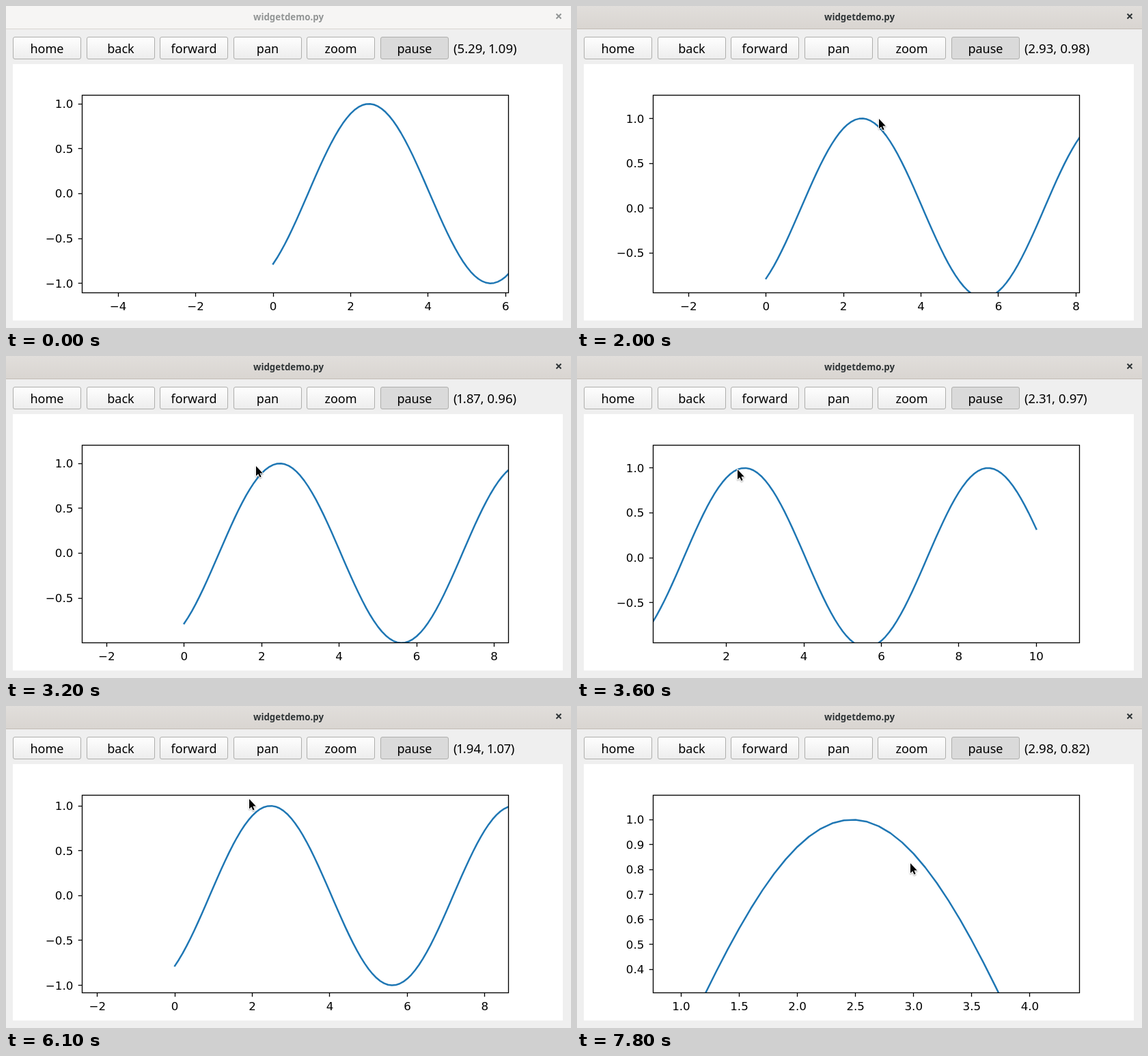
An HTML page with a canvas for the animation above (8 s loop, 827x471 px).

```html
<!DOCTYPE html>
<html lang="en">
<head>
<meta charset="utf-8">
<title>Widget demo</title>
<style>
html, body { margin: 0; width: 100%; height: 100%; overflow: hidden; background: #efefef; }
body { position: relative; font: 18px "Noto Sans", sans-serif; color: #000; }
#bar {
  position: absolute; left: 0; top: 0; width: 827px; height: 33px; box-sizing: border-box;
  font-weight: bold; font-size: 13.3px; line-height: 32px; text-align: center;
  animation: focus 8s step-end infinite;
}
@keyframes focus {
  0% { background: #f6f5f4; color: #929595; box-shadow: 0 1px #dad6d2; }
  15%, 100% { background: linear-gradient(#e1dedb, #d9d5d1); color: #2e3436; box-shadow: 0 1px #c3bcb5; }
}
#bar svg { position: absolute; left: 804px; top: 10px; stroke: currentColor; stroke-width: 2; }
.btn {
  position: absolute; top: 45px; width: 100px; height: 33px; box-sizing: border-box;
  display: flex; align-items: center; justify-content: center; line-height: 24px;
  border: 1px solid #aeaeac; border-radius: 3px; background: linear-gradient(#fefefe, #ededed);
}
.btn.down { background: #dadada; }
#pos {
  position: absolute; left: 655px; top: 50px; line-height: 24px; font-size: 18.7px;
  font-variant-numeric: proportional-nums; white-space: pre;
}
canvas { position: absolute; left: 0; top: 0; }
</style>
</head>
<body>
<div id="bar">widgetdemo.py<svg width="10" height="10"><path d="M1.5 1.5L8.5 8.5M8.5 1.5L1.5 8.5"/></svg></div>
<div id="tools"></div>
<div id="pos"></div>
<canvas id="c" width="827" height="471"></canvas>
<script>
const LOOP = 8000, STEP = 100;
const ENTER = 500, PRESS = 1200, RELEASE = 4350, BAND = 6650, ZOOM = 7700, LAG = 50;
const L = 111.5, T = 130.5, R = 735.5, B = 419.5;
const HOME = { x: 391, y: 274.4, sx: 56.716, sy: 131.25, dx: 2, dy: 0.5, digits: 0 };
const PHASE = 0.9;

// Turning points of the pointer: time, x, y
const PATH = [
  [ENTER, 668, 134], [1000, 524.5, 147.5], [PRESS, 524.5, 147.5],
  [1400, 428.5, 168.8], [1700, 315, 174], [2350, 603.5, 158.4], [2750, 598.5, 158.4],
  [2800, 579, 157], [3600, 236, 168.3], [4300, 380.5, 150.5], [4600, 381, 150.2],
  [5400, 490, 66], [5600, 490, 66], [6100, 357.4, 137.5],
  [6600, 290.2, 133.2], [7400, 498.2, 237.2], [7650, 498.2, 237.2], [7800, 488.9, 232.2]
];

const ctx = document.getElementById("c").getContext("2d");
const pos = document.getElementById("pos");

["home", "back", "forward", "pan", "zoom", "pause"].forEach((name, i) => {
  const b = document.createElement("div");
  b.className = name === "pause" ? "btn down" : "btn";
  b.style.left = Math.round(10 + i * 107.55) + "px";
  b.textContent = name;
  document.getElementById("tools").append(b);
});

const slope = (i, k) => {
  const a = PATH[i], b = PATH[i + 1];
  return a && b ? (b[k] - a[k]) / (b[0] - a[0]) : 0;
};

// Tangent that never overshoots its neighbours
function tangent(i, k) {
  const p = slope(i - 1, k), q = slope(i, k);
  return p * q > 0 ? 2 * p * q / (p + q) : 0;
}

function mouse(t) {
  const next = PATH.findIndex(p => p[0] > t);
  if (next === 0) return PATH[0].slice(1);
  if (next < 0) return PATH[PATH.length - 1].slice(1);
  const i = next - 1, a = PATH[i], b = PATH[next];
  const h = b[0] - a[0], u = (t - a[0]) / h, v = 1 - u;
  return [1, 2].map(k =>
    v * v * (1 + 2 * u) * a[k] + u * u * (3 - 2 * u) * b[k] +
    h * u * v * (v * tangent(i, k) - u * tangent(next, k)));
}

// The dragged plot trails the pointer a little
function panned(t) {
  const [gx, gy] = mouse(PRESS);
  const [x, y] = mouse(Math.min(Math.max(t - LAG, PRESS), RELEASE));
  return { ...HOME, x: HOME.x + x - gx, y: HOME.y + y - gy };
}

function viewAt(t) {
  const v = panned(t);
  if (t < ZOOM) return v;
  const [x0, y0] = mouse(BAND - LAG), [x1, y1] = mouse(ZOOM - LAG);
  const kx = (R - L) / (x1 - x0), ky = (B - T) / (y1 - y0);
  return {
    x: L + (v.x - x0) * kx, y: T + (v.y - y0) * ky,
    sx: v.sx * kx, sy: v.sy * ky, dx: 0.5, dy: 0.1, digits: 1
  };
}

// Outside the axes the last reading stays
function label(t) {
  for (let s = t; s >= ENTER; s -= STEP) {
    const [x, y] = mouse(s);
    if (x < L || x > R || y < T || y > B) continue;
    const v = viewAt(s);
    return `(${((x - v.x) / v.sx).toFixed(2)}, ${((v.y - y) / v.sy).toFixed(2)})`;
  }
  return "(5.29, 1.09)";
}

const num = (n, d) => (n < -1e-9 ? "\u2212" : "") + Math.abs(n).toFixed(d);
const snap = p => Math.floor(p) + 0.5;

function line(x0, y0, x1, y1) {
  ctx.beginPath();
  ctx.moveTo(x0, y0);
  ctx.lineTo(x1, y1);
  ctx.stroke();
}

function drawAxes(v) {
  ctx.strokeStyle = ctx.fillStyle = "#000";
  ctx.lineWidth = 1.33;
  ctx.font = '16.67px "DejaVu Sans", sans-serif';
  ctx.textAlign = "center";
  for (let i = Math.ceil((L - v.x) / v.sx / v.dx); ; i++) {
    const x = v.x + i * v.dx * v.sx;
    if (x > R) break;
    line(snap(x), B, snap(x), B + 5.8);
    ctx.fillText(num(i * v.dx, v.digits), x, 445);
  }
  ctx.textAlign = "right";
  for (let i = Math.ceil((v.y - B) / v.sy / v.dy); ; i++) {
    const y = v.y - i * v.dy * v.sy;
    if (y < T) break;
    line(L, snap(y), L - 5.8, snap(y));
    ctx.fillText(num(i * v.dy, 1), 98.3, Math.round(y) + 6);
  }
  ctx.strokeRect(L, T, R - L, B - T);
}

function drawCurve(v) {
  ctx.save();
  ctx.beginPath();
  ctx.rect(L, T, R - L, B - T);
  ctx.clip();
  ctx.beginPath();
  for (let i = 0; i <= 100; i++) {
    const x = i / 10;
    ctx.lineTo(v.x + x * v.sx, v.y - Math.sin(x - PHASE) * v.sy);
  }
  ctx.strokeStyle = "#1f77b4";
  ctx.lineWidth = 2.5;
  ctx.lineJoin = "round";
  ctx.lineCap = "square";
  ctx.stroke();
  ctx.restore();
}

function drawBand([x, y]) {
  const [left, top] = mouse(BAND - LAG).map(snap);
  ctx.save();
  ctx.strokeStyle = "#000";
  ctx.lineWidth = 1;
  ctx.setLineDash([1, 2]);
  ctx.strokeRect(left, top, snap(x) - left, snap(y) - top);
  ctx.restore();
}

const arrow = new Path2D("M0 0V14.4L3.2 11.5L5.5 16.6L7.6 15.6L5.4 10.6H9.8Z");

function drawPointer([x, y]) {
  ctx.save();
  ctx.translate(Math.round(x - 1), Math.round(y - 2));
  ctx.shadowColor = "rgba(0,0,0,.35)";
  ctx.shadowBlur = 2;
  ctx.shadowOffsetY = 1;
  ctx.strokeStyle = "#fff";
  ctx.lineWidth = 2;
  ctx.lineJoin = "round";
  ctx.stroke(arrow);
  ctx.shadowColor = "transparent";
  ctx.fillStyle = "#000";
  ctx.fill(arrow);
  ctx.restore();
}

function draw(t) {
  const v = viewAt(t), m = mouse(t);
  ctx.clearRect(0, 0, 827, 471);
  ctx.fillStyle = "#fff";
  ctx.fillRect(10, 85, 805, 375);
  drawCurve(v);
  drawAxes(v);
  if (t >= BAND && t < ZOOM) drawBand(m);
  if (t >= ENTER) drawPointer(m);
  pos.textContent = label(t);
}

// One clock for the title bar animation and the plot
const start = performance.now();
document.getElementById("bar").getAnimations()[0].startTime = document.timeline.currentTime;
function tick() {
  const t = (performance.now() - start) % LOOP;
  draw(Math.floor(t / STEP) * STEP);
  requestAnimationFrame(tick);
}
tick();
</script>
</body>
</html>
```
